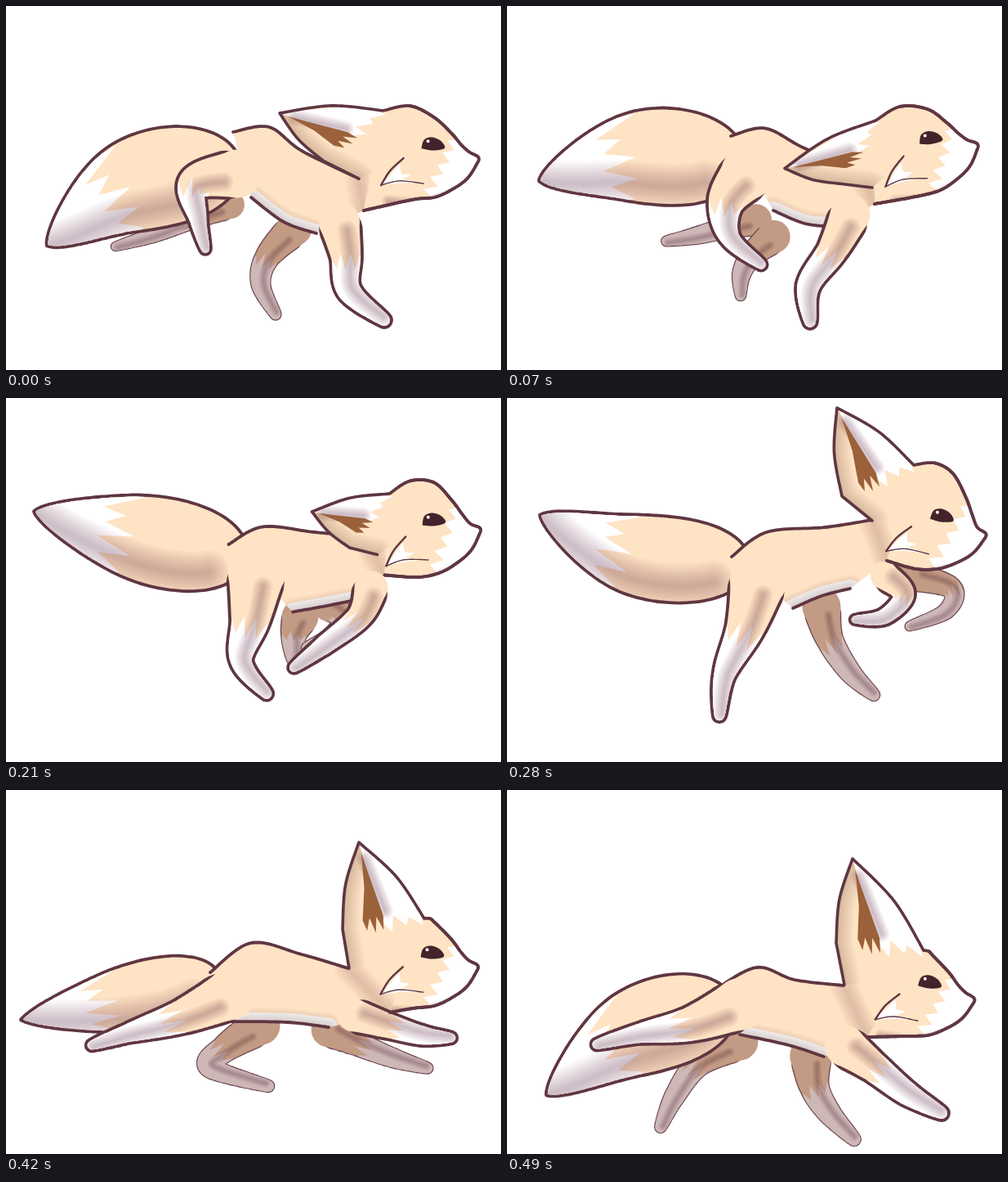
An HTML page with a canvas that plays this animation: 606x445 px, repeating every 0.56 s.

```html
<!DOCTYPE html>
<html lang="en">
<head>
<meta charset="utf-8">
<title>Running fox</title>
<style>
html, body { margin: 0; width: 100%; height: 100%; overflow: hidden; background: #fff; }
canvas { display: block; }
</style>
</head>
<body>
<canvas id="stage" width="606" height="445"></canvas>
<script>
const W = 606, H = 445, STEP = 70, TAU = Math.PI * 2;
const INK = '#5f3641', CREAM = '#fee3c4', BROWN = '#9a613a', SHADE = '#cdb4bd';
const FAR_INK = '#6b4650', FAR_FUR = '#c39a84', FAR_SOCK = '#cdb7b7';
const HIND = [36, 24, 14, 8], FORE = [27, 20, 16, 9], FAR = [22, 15, 12, 7];

// Joints of each key pose. head: eye x, y, tilt, dome height. ear: back base,
// notch, tip, front base. Legs: four joints and a girth; tail: three and a width.
const keyPoses = [
  { // landing
    head: [522, 168, 18, 31], chest: [438, 250], ear: [432, 211, 388, 189, 335, 131, 462, 128],
    back: [278, 154, 322, 148, 362, 177, 432, 211], belly: [380, 278, 340, 264, 300, 234],
    tail: [262, 198, 150, 222, 50, 293, 54],
    hind: [283, 205, 230, 217, 235, 260, 244, 297, 0.87], fore: [408, 264, 416, 305, 420, 348, 463, 384, 1],
    farHind: [275, 243, 230, 260, 180, 280, 134, 294, 0.8], farFore: [353, 272, 320, 307, 312, 340, 330, 377, 1]
  },
  { // gathered
    head: [513, 153, 0, 36], chest: [462, 234], ear: [462, 233, 431, 246, 345, 266, 441, 152],
    back: [270, 164, 310, 151, 365, 170, 430, 190], belly: [430, 262, 390, 268, 352, 266],
    tail: [270, 182, 160, 148, 28, 134, 52],
    hind: [306, 203, 306, 262, 310, 305, 378, 335, 1.05], fore: [432, 246, 380, 293, 318, 336, 279, 388, 0.95],
    farHind: [335, 280, 310, 281, 285, 281, 256, 281, 1], farFore: [300, 292, 280, 302, 262, 316, 242, 331, 0.9]
  },
  { // pushing off
    head: [532, 143, 24, 52], chest: [465, 199], ear: [447, 150, 410, 120, 404, 12, 498, 82],
    back: [275, 194, 318, 164, 390, 158, 447, 149], belly: [420, 233, 385, 242, 350, 257],
    tail: [277, 203, 150, 190, 40, 143, 46],
    hind: [308, 222, 292, 280, 266, 338, 260, 388, 1.03], fore: [462, 217, 486, 240, 462, 267, 426, 271, 0.7],
    farHind: [385, 255, 395, 295, 420, 335, 449, 363, 1.1], farFore: [490, 217, 544, 232, 538, 260, 493, 279, 0.85]
  },
  { // leaping
    head: [528, 156, 35, 46], chest: [478, 214], ear: [441, 168, 416, 96, 433, 12, 513, 104],
    back: [262, 190, 290, 153, 370, 150, 439, 166], belly: [412, 231, 380, 233, 348, 233],
    tail: [255, 222, 150, 266, 38, 307, 50],
    hind: [300, 218, 255, 256, 221, 298, 196, 336, 1.03], fore: [432, 214, 485, 236, 528, 260, 558, 281, 0.8],
    farHind: [330, 252, 334, 290, 320, 320, 363, 346, 1.2], farFore: [470, 250, 510, 259, 550, 264, 581, 266, 0.8]
  },
  { // stretched
    head: [521, 198, 17.5, 36], chest: [470, 272], ear: [420, 218, 412, 170, 432, 64, 512, 157],
    back: [250, 223, 300, 187, 362, 201, 419, 218], belly: [395, 290, 345, 284, 275, 283],
    tail: [246, 234, 135, 258, 18, 281, 36],
    hind: [275, 250, 215, 277, 150, 297, 105, 312, 0.92], fore: [425, 275, 470, 289, 510, 300, 545, 303, 0.82],
    farHind: [312, 288, 268, 316, 250, 339, 321, 362, 1.1], farFore: [395, 293, 430, 310, 475, 328, 516, 340, 1]
  },
  { // reaching down
    head: [517, 234, 22, 31], chest: [441, 302], ear: [413, 238, 403, 187, 423, 84, 510, 196],
    back: [252, 246, 305, 217, 352, 232, 412, 239], belly: [388, 326, 345, 312, 285, 299],
    tail: [256, 268, 150, 300, 48, 373, 50],
    hind: [285, 262, 225, 286, 160, 298, 110, 311, 0.94], fore: [414, 313, 448, 338, 490, 371, 532, 395, 1],
    farHind: [285, 308, 235, 334, 205, 375, 188, 412, 1.05], farFore: [372, 325, 376, 362, 394, 394, 425, 427, 1.2]
  }
];

const lerp = (a, b, u) => a + (b - a) * u;
const mix = (a, b, u) => [lerp(a[0], b[0], u), lerp(a[1], b[1], u)];
const rand = n => Math.abs(Math.sin(n * 12.9898) * 43758.5453) % 1;

function pairs(list) {
  const out = [];
  for (let i = 0; i + 1 < list.length; i += 2) out.push([list[i], list[i + 1]]);
  return out;
}

function halfway(a, b) {
  const pose = {};
  for (const key in a) pose[key] = a[key].map((v, i) => lerp(v, b[key][i], 0.5));
  return pose;
}

// Catmull-Rom curve through the points.
function spline(p, steps = 16) {
  const out = [p[0]];
  for (let i = 0; i < p.length - 1; i++) {
    const a = p[i - 1] || p[i], b = p[i], c = p[i + 1], d = p[i + 2] || c;
    for (let k = 1; k <= steps; k++) {
      const t = k / steps;
      out.push([0, 1].map(j => b[j] + t / 2 * (c[j] - a[j] +
        t * (2 * a[j] - 5 * b[j] + 4 * c[j] - d[j] + t * (3 * (b[j] - c[j]) + d[j] - a[j])))));
    }
  }
  return out;
}

function bow(a, b, k) {
  const m = mix(a, b, 0.5);
  return [m[0] + (b[1] - a[1]) * k, m[1] - (b[0] - a[0]) * k];
}

// Ragged fur edge: place(v, depth) maps it onto a part.
function fur(n, seed, place) {
  const out = [];
  for (let i = 0; i <= 2 * n; i++) {
    const r = rand(seed + i);
    out.push(place(i / (2 * n), i % 2 ? 0.55 + 0.45 * r : 0.25 * r));
  }
  return out;
}

// A rounded shape swept along a curved axis.
function tube(joints, radius) {
  const axis = spline(joints, 48), last = axis.length - 1;
  function place(t, side) {
    const i = Math.round(t * last);
    const a = axis[Math.max(i - 1, 0)], b = axis[Math.min(i + 1, last)];
    const k = side * radius(i / last) / (Math.hypot(b[0] - a[0], b[1] - a[1]) || 1);
    return [axis[i][0] - (b[1] - a[1]) * k, axis[i][1] + (b[0] - a[0]) * k];
  }
  function run(from, to, side) {
    const out = [];
    for (let k = 0; k <= 24; k++) out.push(place(lerp(from, to, k / 24), side));
    return out;
  }
  return { axis, radius, place, run };
}

function leg(data, radii) {
  const girth = data[8];
  return tube(pairs(data.slice(0, 8)), t => {
    const i = Math.min(Math.floor(t * 3), 2);
    return girth * lerp(radii[i], radii[i + 1], t * 3 - i);
  });
}

function tailTube(data) {
  return tube(pairs(data.slice(0, 6)), t =>
    data[6] * Math.max(0, Math.sin(Math.PI * t ** 0.68)) + 10 * (1 - t));
}

function paint(pose) {
  const layer = document.createElement('canvas');
  layer.width = W;
  layer.height = H;
  const c = layer.getContext('2d');
  c.lineCap = c.lineJoin = 'round';

  function path(pts) {
    c.beginPath();
    pts.forEach(p => c.lineTo(...p));
  }
  function fill(pts, color) {
    path(pts);
    c.fillStyle = color;
    c.fill();
  }
  function line(pts, width, color = INK) {
    path(pts);
    c.lineWidth = width;
    c.strokeStyle = color;
    c.stroke();
  }
  function soft(pts, width, strength = 0.09) {
    c.save();
    c.globalCompositeOperation = 'multiply';
    c.globalAlpha = strength;
    for (let k = 10; k > 0; k--) line(pts, width * k / 10, SHADE);
    c.restore();
  }
  function clipped(pts, detail) {
    c.save();
    path(pts);
    c.clip();
    detail();
    c.restore();
  }
  function discs(part, grow, from) {
    c.beginPath();
    const n = part.axis.length - 1;
    for (let i = Math.ceil(from * n); i <= n; i++) {
      const [x, y] = part.axis[i], r = Math.max(part.radius(i / n) + grow, 0.1);
      c.moveTo(x + r, y);
      c.arc(x, y, r, 0, TAU);
    }
  }
  function sweep(part, o) {
    discs(part, o.pen / 2, o.open);
    c.fillStyle = o.ink;
    c.fill();
    discs(part, -o.pen / 2, 0);
    c.fillStyle = o.fur;
    c.fill();
    c.save();
    c.clip();
    const edge = fur(o.tufts, o.seed, (v, d) => part.place(o.sock - 0.2 * d, lerp(-1.2, 1.2, v)));
    fill([...edge, ...part.run(o.sock, 1, 1.2), ...part.run(1, o.sock, -1.2)], o.tip);
    discs(part, 0, 0.85);
    c.fill();
    soft(part.run(0.12, 0.97, o.side), o.shade);
    c.restore();
  }

  const near = { pen: 3.8, ink: INK, fur: CREAM, tip: '#fff', open: 0.1, sock: 0.48, tufts: 4, seed: 3, side: -0.3, shade: 24 };
  const far = { ...near, pen: 1.3, ink: FAR_INK, fur: FAR_FUR, tip: FAR_SOCK, shade: 12 };

  const [ex, ey, tilt, dome] = pose.head;
  const cos = Math.cos(tilt * TAU / 360), sin = Math.sin(tilt * TAU / 360);
  const face = (x, y) => [ex + x * cos - y * sin, ey + x * sin + y * cos];
  const [base, notch, tip, front] = pairs(pose.ear);
  const back = spline(pairs(pose.back)), belly = spline(pairs(pose.belly));
  const crown = face(-8, -dome);
  const head = spline([front, bow(front, crown, 0.16), crown, face(18, -0.62 * dome),
    face(34, -0.3 * dome), face(46, -4), face(59, -1), face(59, 9), face(54, 27),
    face(43, 43), face(24, 61), face(-2, 73), pose.chest]);
  const torso = [...back, front, pose.chest, ...belly];

  sweep(leg(pose.farHind, FAR), far);
  sweep(leg(pose.farFore, FAR), far);
  sweep(tailTube(pose.tail), { ...near, open: 0, sock: 0.66, tufts: 5, side: -0.6, shade: 54 });

  fill(torso, CREAM);
  fill(head, CREAM);
  clipped(torso, () => {
    line(belly, 22, '#fff');
    soft(belly, 34, 0.07);
    soft([back[back.length - 1], pose.chest], 34, 0.05);
  });
  line(back, 3.8);
  line(belly, 3.8);
  line(head, 3.8);

  sweep(leg(pose.fore, FORE), near);
  sweep(leg(pose.hind, HIND), near);

  const inEar = (u, v) => mix(tip, mix(notch, front, u), v);
  const ear = [base, ...spline([notch, bow(notch, tip, 0.06), tip]),
    ...spline([tip, bow(tip, front, 0.06), front])];
  const earFill = [...ear, [ex, ey]];
  fill(earFill, CREAM);
  clipped(earFill, () => {
    soft(ear.slice(0, 30), 40, 0.07);
    fill([tip, ...fur(4, 8, (v, d) => inEar(lerp(1.2, 0.48, v), 0.9 + 0.28 * d))], '#fff');
    soft([inEar(0.53, 0.2), inEar(0.58, 0.85)], 20);
    fill([inEar(0.42, 0.13), ...fur(3, 21, (v, d) => inEar(lerp(0.53, 0.25, v), 0.87 + 0.24 * d)),
      inEar(0.32, 0.55)], BROWN);
  });
  line(ear, 3.6);

  clipped(head, () => {
    const edge = fur(5, 14, (v, d) => face(35 - 10 * v - 23 * d, lerp(-0.55 * dome, 64, v)));
    fill([...edge, face(75, 64), face(75, -24)], '#fff');
    soft([face(-30, 84), face(10, 75), face(45, 50)], 16);
  });
  line(head.slice(16), 3.8);
  fill([face(-30, 36), face(-25, 47), face(-13, 45), face(-22, 53), face(4, 50), face(-22, 58), face(-44, 68)], '#fff');
  line(spline([face(-28, 28), face(-39, 48), face(-44, 68)]), 2.4);
  line(spline([face(-44, 68), face(-24, 56), face(5, 50)]), 1.4);
  const eye = [[-11, 10], [-11, -1], [-3, -7], [9, -6], [16, 1], [3, 8], [-11, 10]];
  fill(spline(eye.map(p => face(...p))), '#44222a');
  c.beginPath();
  c.arc(...face(-6, -1), 2, 0, TAU);
  c.fillStyle = '#fff';
  c.fill();
  return layer;
}

const [landing, gathered, push, ...flight] = keyPoses;
const cycle = [landing, halfway(landing, gathered), gathered, halfway(gathered, push), push, ...flight].map(paint);
const view = document.getElementById('stage').getContext('2d');
const start = performance.now();

function draw() {
  const t = performance.now() - start;
  view.fillStyle = '#fff';
  view.fillRect(0, 0, W, H);
  view.drawImage(cycle[Math.floor(t / STEP) % cycle.length], 0, 0);
  requestAnimationFrame(draw);
}
draw();
</script>
</body>
</html>
```
